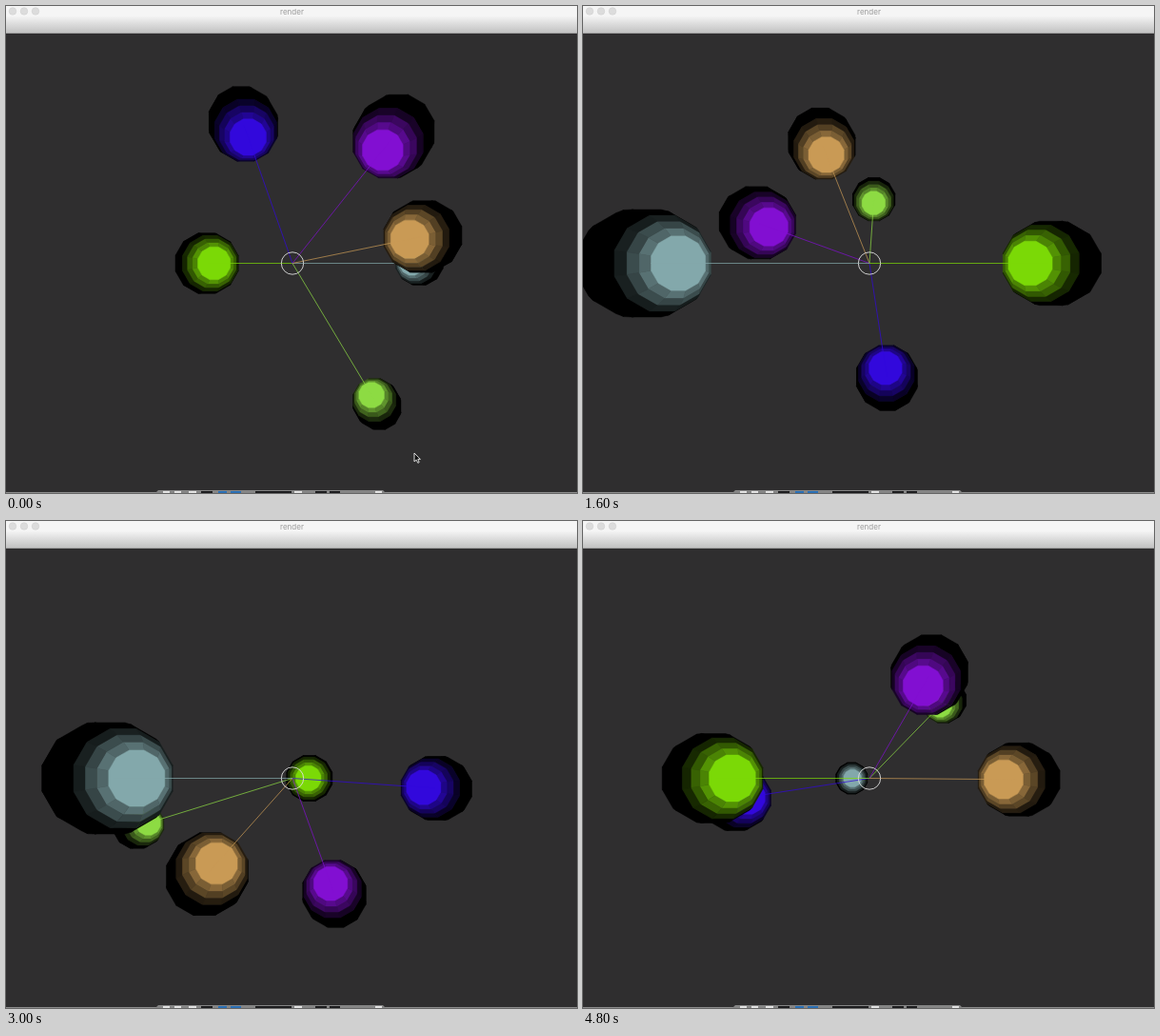
An HTML page that plays this animation: 600x512 px, repeating every 4.9 s.

```html
<!DOCTYPE html>
<html lang="en">
<head>
<meta charset="utf-8">
<title>render</title>
<style>
  html, body { margin: 0; width: 100%; height: 100%; overflow: hidden; background: #2f2e2f; }
  svg { display: block; width: 600px; height: 512px; }
</style>
</head>
<body>
<svg viewBox="0 0 600 512" xmlns="http://www.w3.org/2000/svg">
  <defs>
    <linearGradient id="bar" x1="0" y1="0" x2="0" y2="1">
      <stop offset="0" stop-color="#f3f3f3"/>
      <stop offset="1" stop-color="#c2c2c2"/>
    </linearGradient>
  </defs>
  <rect width="600" height="512" fill="#2f2e2f"/>
  <g id="scene"></g>
  <circle cx="301" cy="270.5" r="11.7" fill="none" stroke="#dcdcdc" stroke-width=".9"/>
  <rect y="511" width="600" height="1" fill="#8c8c8c"/>
  <g id="dock">
    <path d="M157 512L160 509H396L399 512Z" fill="#858585"/>
    <path d="M205 511H217M262 511H300M325 511H337M340 511H351" stroke="#1c1c1e" stroke-width="2"/>
    <path d="M223 511H232M236 511H247" stroke="#2a6fb5" stroke-width="2"/>
    <path d="M165 511H172M177 511H184M192 511H200M303 511H311M388 511H395" stroke="#e2e2e2" stroke-width="2"/>
  </g>
  <path id="cursor" d="M0 0V9L2.2 7.2L3.8 10.4L5.2 9.7L3.8 6.6H6.4Z" fill="#111" stroke="#eee" stroke-width=".9"/>
  <rect width="600" height="12" fill="#f5f5f5"/>
  <rect y="11" width="600" height="17" fill="url(#bar)"/>
  <rect y="28" width="600" height="1" fill="#a0a0a0"/>
  <g fill="#dcdcdc" stroke="#cdcdcd" stroke-width=".5">
    <circle cx="7" cy="5.5" r="3.8"/><circle cx="19" cy="5.5" r="3.8"/><circle cx="31" cy="5.5" r="3.8"/>
  </g>
  <text x="300.5" y="8.6" text-anchor="middle" font-family="Inter, 'Liberation Sans', sans-serif" font-size="8" fill="#9b9b9b">render</text>
</svg>
<script>
const LOOP = 4900, STEP = 100;
const CENTER = { x: 301, y: 270.5 };
const FOCAL = 325, CAMERA = 9.2;     // perspective, camera distance in world units
const PULL = 29.8;                   // attraction to the center, falling off as 1 / distance
const DT = .001;
const SLICES = 12;
const STACK = rad(12), CAP = rad(36);
const SHADES = [.64, .43, .18];      // lit bands around the cap, the rest is black

// Each ball starts from the outermost point of its orbit:
// time in s, bearing in its plane in degrees, distance and speed there.
const balls = [
  { rgb: [131, 168, 171], size: .8, tilt: -90, apex: { time: 2.2, bearing: -121, reach: 6.53, speed: .54 } },
  { rgb: [123, 217, 6], size: .88, tilt: -90, apex: { time: 1.45, bearing: -45, reach: 4.69, speed: 3.8 } },
  { rgb: [50, 8, 220], size: .98, tilt: 7.5, apex: { time: 2.445, bearing: 332, reach: 4.51, speed: 4.21 } },
  { rgb: [130, 15, 210], size: 1.062, tilt: 14.5, apex: { time: 3.54, bearing: 329.3, reach: 4.56, speed: 4.47 } },
  { rgb: [201, 154, 85], size: 1.118, tilt: -14, apex: { time: 4.225, bearing: 325.3, reach: 4.66, speed: 4.64 } },
  { rgb: [141, 219, 67], size: .667, tilt: -7.5, apex: { time: 2.9, bearing: 198.3, reach: 4.67, speed: 3.31 } }
];

function rad(deg) { return deg * Math.PI / 180; }

function tone(rgb, k) { return `rgb(${rgb.map(c => Math.min(255, Math.round(c * k)))})`; }

function add(parent, tag, attrs) {
  const el = document.createElementNS('http://www.w3.org/2000/svg', tag);
  for (const name in attrs) el.setAttribute(name, attrs[name]);
  return parent.appendChild(el);
}

const scene = document.getElementById('scene');
const cursor = document.getElementById('cursor');

for (const ball of balls) {
  ball.group = add(scene, 'g', { 'stroke-width': .5, 'stroke-linejoin': 'round' });
  const layer = color => add(ball.group, 'path', { fill: color, stroke: color });
  ball.black = layer('#000');
  // two slightly different tones per band make the facets visible
  ball.bands = SHADES.map(s => [1.05, .95].map(k => layer(tone(ball.rgb, s * k))));
  ball.cap = layer(tone(ball.rgb, 1));
  ball.line = add(ball.group, 'line', {
    x1: CENTER.x, y1: CENTER.y, stroke: tone(ball.rgb, 1), 'stroke-width': .9, 'stroke-opacity': .8
  });
}

// Leapfrog integration from the apex, forwards or backwards
function orbit({ time, bearing, reach, speed }, now) {
  const n = Math.max(1, Math.ceil(Math.abs(now - time) / DT)), dt = (now - time) / n;
  const c = Math.cos(rad(bearing)), s = Math.sin(rad(bearing));
  let x = reach * c, y = reach * s, vx = -speed * s, vy = speed * c;
  for (let i = 0; i < n; i++) {
    x += vx * dt / 2;
    y += vy * dt / 2;
    const a = PULL / (x * x + y * y);
    vx -= a * x * dt;
    vy -= a * y * dt;
    x += vx * dt / 2;
    y += vy * dt / 2;
  }
  return [x, y];
}

function outline(points) {
  return 'M' + points.map(p => p[0].toFixed(2) + ' ' + p[1].toFixed(2)).join('L') + 'Z';
}

// The far inside wall of a ball, seen in perspective
function drawBall(ball, x, y, radius) {
  const ratio = radius / FOCAL;
  const rings = [];
  for (let theta = CAP; theta < Math.PI + .01; theta += STACK) {
    const k = 1 / (1 + ratio * Math.cos(theta)), r = radius * Math.sin(theta);
    rings.push(Array.from({ length: SLICES }, (_, j) => {
      const phi = (j + .5) / SLICES * 2 * Math.PI;
      return [CENTER.x + (x + r * Math.cos(phi)) * k, CENTER.y + (y + r * Math.sin(phi)) * k];
    }));
  }
  const lit = SHADES.map(() => ['', '']);
  let dark = '';
  for (let i = 0; i < rings.length - 1; i++) {
    for (let j = 0; j < SLICES; j++) {
      const next = (j + 1) % SLICES;
      const a = rings[i][j], b = rings[i + 1][j], c = rings[i + 1][next], d = rings[i][next];
      const facing = (c[0] - a[0]) * (d[1] - b[1]) - (c[1] - a[1]) * (d[0] - b[0]);
      if (facing <= 0) continue;
      if (i < SHADES.length) lit[i][(i + j) % 2] += outline([a, b, c, d]);
      else dark += outline([a, b, c, d]);
    }
  }
  ball.black.setAttribute('d', dark);
  ball.bands.forEach((pair, i) => pair.forEach((path, k) => path.setAttribute('d', lit[i][k])));
  ball.cap.setAttribute('d', outline(rings[0]));
}

// The motion lags a little in the middle of the loop
function worldTime(t) { return t - .14 * Math.exp(-(((t - 2.75) / .7) ** 2)); }

function render(t) {
  const now = worldTime(t / 1000);
  for (const ball of balls) {
    const [u, v] = orbit(ball.apex, now);
    const tilt = rad(ball.tilt);
    const scale = FOCAL / (CAMERA - v * Math.sin(tilt));
    const x = u * scale, y = -v * Math.cos(tilt) * scale;
    drawBall(ball, x, y, ball.size * scale);
    ball.line.setAttribute('x2', CENTER.x + x);
    ball.line.setAttribute('y2', CENTER.y + y);
    ball.nearness = scale;
  }
  [...balls].sort((a, b) => a.nearness - b.nearness).forEach(ball => scene.appendChild(ball.group));

  const u = Math.min(1, t / 500);
  cursor.setAttribute('transform', `translate(${429 + 142 * u} ${470 + 43 * u * u})`);
}

let shown = -1;
function tick() {
  const t = Math.floor(performance.now() % LOOP / STEP) * STEP;
  if (t !== shown) render(shown = t);
  requestAnimationFrame(tick);
}
tick();
</script>
</body>
</html>
```
